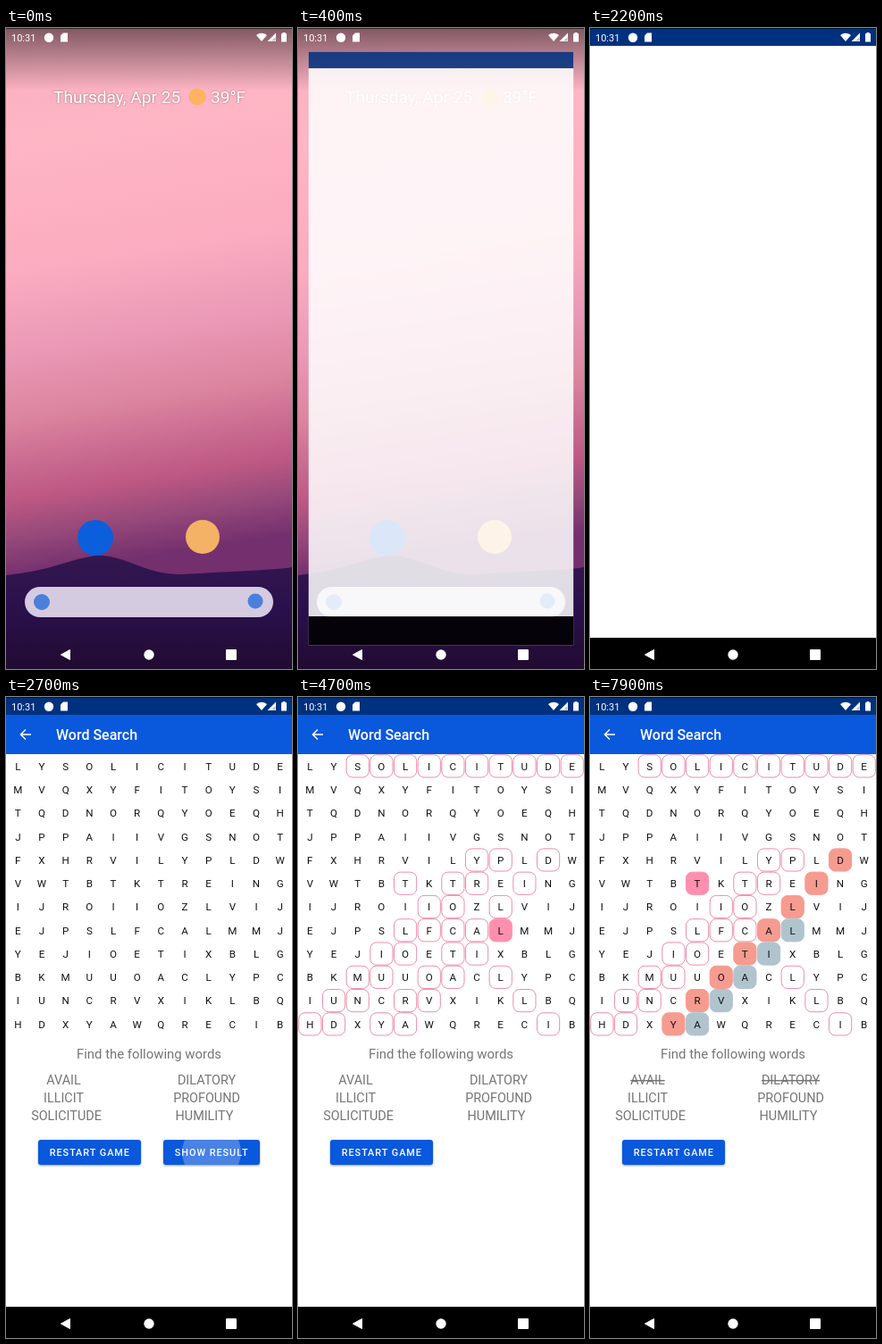
Write an HTML page that moves like this. It is 320 px wide and 718 px high and loops after 8 s.

```html
<!DOCTYPE html>
<html lang="en">
<head>
<meta charset="utf-8">
<title>Word puzzle</title>
<style>
  html, body { margin: 0; width: 100%; height: 100%; overflow: hidden; }
  svg { display: block; width: 320px; height: 718px; font-family: Roboto, sans-serif; }
  .date { font-size: 19.1px; fill: #fff; filter: drop-shadow(0 0 1px #0006); }
  .bold { font-weight: 500; fill: #fff; }
  .button { font-size: 10.9px; letter-spacing: .97px; }
  .mid { text-anchor: middle; }
  .words { font-size: 14.4px; fill: #757575; }
  .letters { font-size: 11.6px; fill: #111; }
  .found { text-decoration: line-through; }
  .raised { fill: #0a58dc; filter: drop-shadow(0 1px 1px #0006); }
</style>
</head>
<body>
<svg viewBox="0 0 320 718">
  <defs>
    <linearGradient id="sky" gradientUnits="userSpaceOnUse" x1="0" y1="0" x2="100" y2="640">
      <stop offset="0" stop-color="#f8aebf"/>
      <stop offset=".2" stop-color="#feb5c4"/>
      <stop offset=".42" stop-color="#fbacc0"/>
      <stop offset=".56" stop-color="#ea98b6"/>
      <stop offset=".67" stop-color="#dc859f"/>
      <stop offset=".75" stop-color="#c96a90"/>
      <stop offset=".81" stop-color="#bd5883"/>
      <stop offset=".87" stop-color="#984a7b"/>
      <stop offset=".94" stop-color="#74306e"/>
    </linearGradient>
    <linearGradient id="hill" x2="0" y2="1">
      <stop stop-color="#33174f"/>
      <stop offset=".5" stop-color="#2a104b"/>
      <stop offset="1" stop-color="#210b30"/>
    </linearGradient>
    <linearGradient id="scrim" x2="0" y2="1">
      <stop stop-color="#402a30" stop-opacity=".65"/>
      <stop offset="1" stop-color="#402a30" stop-opacity="0"/>
    </linearGradient>
    <clipPath id="buttonClip"><rect x="176" y="496" width="108" height="28" rx="3"/></clipPath>
  </defs>

  <g id="home">
    <rect width="320" height="718" fill="url(#sky)"/>
    <path d="M0 613Q35 609 60 601T100 591T145 601T195 612T270 608T320 603V718H0Z" fill="url(#hill)"/>
    <rect width="320" height="70" fill="url(#scrim)"/>
    <text class="date" x="53" y="84">Thursday, Apr 25</text>
    <text class="date" x="229" y="84">39°F</text>
    <circle cx="214" cy="77" r="9.5" fill="#fdb35f"/>
    <circle cx="100" cy="571" r="20" fill="#0b5fdc"/>
    <circle cx="220" cy="570" r="19" fill="#f3b265"/>
    <rect x="21" y="626" width="278" height="34" rx="17" fill="#d5cbe0"/>
    <circle cx="40" cy="643" r="9" fill="#4a7fdc"/>
    <circle cx="279" cy="642" r="8.5" fill="#4a80dd"/>
  </g>

  <g id="app">
    <rect width="320" height="718" fill="#fff"/>
    <rect width="320" height="20" fill="#00317f"/>
    <rect y="683" width="320" height="35"/>
    <g id="game">
      <rect y="20" width="320" height="44" fill="#0a58dc"/>
      <path d="M28 42H17M22 36.5L16.5 42L22 47.5" fill="none" stroke="#fff" stroke-width="1.5"/>
      <text class="bold" x="56" y="48" font-size="16">Word Search</text>
      <g id="cells"></g>
      <g id="letters" class="letters mid"></g>
      <text class="words mid" x="160" y="404.5" style="font-size:14.9px">Find the following words</text>
      <g id="words" class="words mid"></g>
      <rect class="raised" x="36" y="496" width="115" height="28" rx="3"/>
      <text class="bold button" x="48.7" y="514">RESTART GAME</text>
      <g id="show">
        <rect class="raised" x="176" y="496" width="108" height="28" rx="3"/>
        <circle id="ripple" cx="230" cy="510" fill="#fff" clip-path="url(#buttonClip)"/>
        <text class="bold button" x="188.7" y="514">SHOW RESULT</text>
      </g>
    </g>
  </g>

  <g fill="#fff">
    <rect width="320" height="1" fill="#000" opacity=".6"/>
    <text x="6" y="15" font-size="11">10:31</text>
    <circle cx="48" cy="10.7" r="5.2"/>
    <path d="M61 8.5L64 5.5H69V15.5H61Z"/>
    <path d="M280 8Q286 3.5 292 8L286 15Z"/>
    <path d="M302 5.5V15H292.5Z"/>
    <path d="M297 14.5L301.5 10V14.5Z" fill="#0004"/>
    <path d="M308 6.3H309.5V5H312.5V6.3H314V15.5H308Z"/>
    <path d="M61.5 702L71.5 696.5V707.5Z" stroke="#fff" stroke-linejoin="round"/>
    <circle cx="160" cy="702" r="5.7"/>
    <rect x="246" y="696" width="12" height="12" rx="1"/>
  </g>
</svg>
<script>
const LOOP = 8000, STEP = 100, COL = 320 / 12, ROW = 26.27;
const PINK = '#ff8fae', SALMON = '#f69b90', GREY = '#b0c4ce';
const OPEN_END = 909, GAME = 2400, TAP = 2600, RESULT = 3100;

const grid = `LYSOLICITUDE MVQXYFITOYSI TQDNORQYOEQH JPPAIIVGSNOT
  FXHRVILYPLDW VWTBTKTREING IJROIIOZLVIJ EJPSLFCALMMJ
  YEJIOETIXBLG BKMUUOACLYPC IUNCRVXIKLBQ HDXYAWQRECIB`.split(/\s+/);

// first cell, direction, list position; found words also get a colour and a time
const words = [
  { text: 'AVAIL', col: 4, row: 11, dx: 1, dy: -1, x: 64.5, y: 434, color: GREY, found: 5000 },
  { text: 'ILLICIT', col: 10, row: 11, dx: -1, dy: -1, x: 64.5, y: 454 },
  { text: 'SOLICITUDE', col: 2, row: 0, dx: 1, dy: 0, x: 67.5, y: 474 },
  { text: 'DILATORY', col: 10, row: 4, dx: -1, dy: 1, x: 224.5, y: 434, color: SALMON, found: 7000 },
  { text: 'PROFOUND', col: 8, row: 4, dx: -1, dy: 1, x: 224.5, y: 454 },
  { text: 'HUMILITY', col: 0, row: 11, dx: 1, dy: -1, x: 222, y: 474 },
];
const taps = [
  { col: 8, row: 7, at: 4100 },
  { col: 10, row: 4, at: 5600 },
  { col: 4, row: 5, at: 7800 },
];

const $ = id => document.getElementById(id);
function add(parent, tag, attrs, text = '') {
  const el = document.createElementNS('http://www.w3.org/2000/svg', tag);
  for (const key in attrs) el.setAttribute(key, attrs[key]);
  el.textContent = text;
  return parent.appendChild(el);
}

const cells = grid.map((line, row) => [...line].map((letter, col) => {
  add($('letters'), 'text', { x: (col + .5) * COL, y: 81.7 + row * ROW }, letter);
  return add($('cells'), 'rect', {
    x: col * COL + .8, y: 64.8 + row * ROW, width: 25.2, height: 25.2, rx: 7,
  });
}));
for (const w of words) {
  w.cells = [...w.text].map((_, i) => cells[w.row + i * w.dy][w.col + i * w.dx]);
  w.label = add($('words'), 'text', { x: w.x, y: w.y }, w.text);
}

const show = (el, on) => el.setAttribute('display', on ? 'inline' : 'none');
function paint(cell, fill, stroke) {
  cell.setAttribute('fill', fill);
  cell.setAttribute('stroke', stroke);
}

function draw(t) {
  const left = Math.max(0, (OPEN_END - t) / 609);
  const scale = 1 - .106 * left * left;
  $('app').setAttribute('transform', `translate(160 359) scale(${scale}) translate(-160 -359)`);
  $('app').setAttribute('opacity', Math.min(1, Math.max(0, (t - 50) / 410)));
  show($('app'), t >= 100);
  show($('game'), t >= GAME);
  show($('show'), t < RESULT);
  $('ripple').setAttribute('r', t < TAP ? 0 : 17 + (t - TAP) * .16);
  $('ripple').setAttribute('opacity', .25 * Math.min(1, Math.max(0, (RESULT - t) / 300)));

  cells.flat().forEach(cell => paint(cell, 'none', 'none'));
  if (t >= RESULT) words.forEach(w => w.cells.forEach(c => paint(c, 'none', '#f08ca8')));
  for (const { col, row, at } of taps) if (t >= at) paint(cells[row][col], PINK, PINK);
  for (const w of words) {
    const found = t >= w.found;
    w.label.classList.toggle('found', found);
    if (found) w.cells.forEach(c => paint(c, w.color, w.color));
  }
}

const start = performance.now();
function tick() {
  const t = (performance.now() - start) % LOOP;
  draw(Math.floor(t / STEP) * STEP);
  requestAnimationFrame(tick);
}
tick();
</script>
</body>
</html>
```
